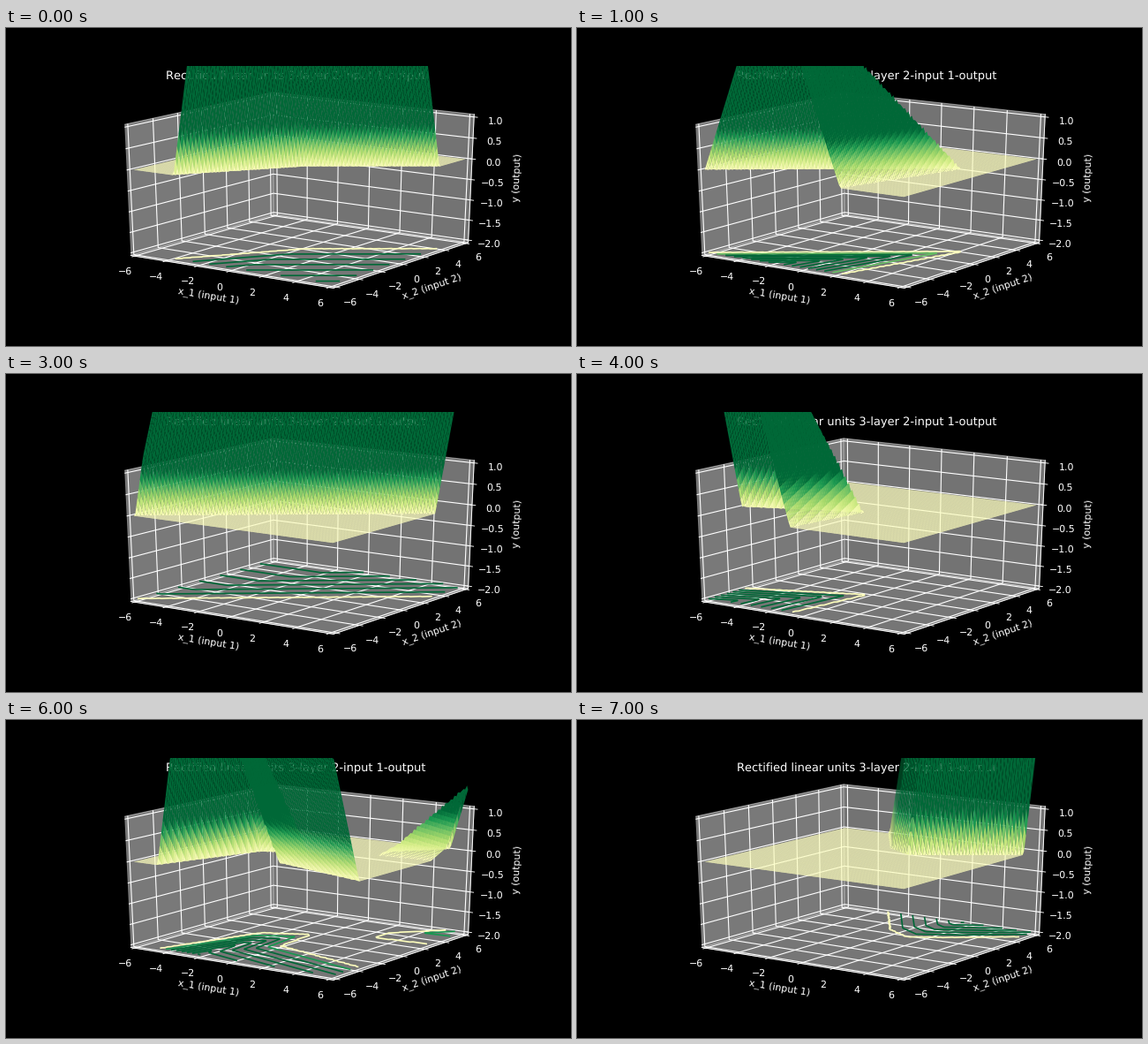
Write a matplotlib script that moves like this. It is 640 by 360 pixels and loops after 8 s.

```python
import numpy as np
import matplotlib.pyplot as plt
from matplotlib.animation import FuncAnimation

plt.style.use("dark_background")
plt.rcParams.update({"text.hinting": "none", "text.hinting_factor": 1,
                     "grid.linewidth": 1.0})

fig = plt.figure(figsize=(8, 4.5), dpi=80)
ax = fig.add_subplot(projection="3d")

# Fill the whole wide axes with a unit cube instead of a square viewport.
ax.apply_aspect = lambda position=None: None
ax.set_box_aspect((1, 1, 1), zoom=3 ** 0.5 / 1.8294640721620434)
ax.view_init(elev=20, azim=-55)
ax.set_xlim(-6.25, 6.25)
ax.set_ylim(-6.25, 6.25)
ax.set_zlim(-2.0625, 1.0625)
ax.set_xlabel("x_1 (input 1)")
ax.set_ylabel("x_2 (input 2)")
ax.set_zlabel("y (output)")
ax.text2D(0.5, 0.944, "Rectified linear units 3-layer 2-input 1-output",
          transform=ax.transAxes, ha="center", va="baseline", fontsize=12)

grid = np.linspace(-6, 6, 100)
X, Y = np.meshgrid(grid, grid)


def relu(v):
    return np.maximum(v, 0)


def lowest(*planes):
    return np.minimum.reduce(planes)


def highest(*planes):
    return np.maximum.reduce(planes)


def front_slope(x, y):
    return lowest(2.4 * (x + 3.5) - 1.71 * (y + 6),
                  1.9 * (x - 0.5) - 2.0 * (y + 0.33),
                  1.2 * (x - 6) - 1.7 * (y - 3.5))


def front_wedge(x, y):
    return lowest(1.5 * (0.73 * (x + 6) - (y + 6)),
                  1.2 * (2.3 + 0.276 * (y + 6) - x))


def small_peak(x, y):
    return lowest(1.9 * (x + 4.35) - 1.75 * (y + 6),
                  -0.32 * (x + 1.25) - 0.227 * (y + 6))


def back_slope(x, y):
    return lowest(1.6 * (y + 5.9 - 0.75 * (x + 6)),
                  1.1 * (y + 6) + 0.3)


def left_wedge(x, y):
    return lowest(0.77 * (x + 6) - 2 * (y + 3),
                  0.2 * (y + 6) - 1.55 * (x + 0.7))


def open_corner(x, y):
    d = relu(0.15 - 0.1 * y + 0.32 * relu(y - 3.9) - x)
    e = relu(0.06 + 0.325 * x - y)
    side = (3 * d - 3.45 * relu(d - 0.52) + 1.85 * relu(d - 1.04)
            + 2.6 * relu(d - 1.9))
    front = 5.5 * e - 4.5 * relu(e - 0.6)
    return highest(side, front)


def two_hills(x, y):
    left_side = 2.4 * (x + 4.5 - 0.347 * (y + 6))
    left = lowest(left_side,
                  1.2 * (0.49 * (x + 2.45) - (y + 0.1)),
                  2.0 * (-0.1 - 0.097 * y - x))
    front = lowest(left_side, 1.25 * (-2.1 - 0.28 * (x - 0.1) - y))
    e = y - 2.4 - 0.1 * (x - 3)
    right = lowest(highest(0.15 * e, 0.75 * (e - 1.1)),
                   1.6 * (x - 3.2 - 0.9 * (y - 3.9)),
                   0.6 * (x - 3))
    return highest(left, front, right)


def back_corner(x, y):
    return lowest(2.6 * (x + 3.1) + 1.88 * (y - 6),
                  2.5 * (y + 0.588 * x - 2.1),
                  2.8 * (y - 1.4 - 0.583 * (x - 1.2)),
                  3.0 * (y - 2.45 - 0.77 * (x - 3)))


outputs = [front_slope, front_wedge, small_peak, back_slope,
           left_wedge, open_corner, two_hills, back_corner]


def draw(i):
    for item in list(ax.collections):
        item.remove()
    z = relu(outputs[i](X, Y))
    look = dict(cmap="RdYlGn", vmin=-1, vmax=1)
    ax.plot_surface(X, Y, z, rstride=1, cstride=1, linewidth=0, **look)
    ax.contour(X, Y, z, zdir="z", offset=-2, **look)
    return ax.collections


anim = FuncAnimation(fig, draw, frames=len(outputs), init_func=lambda: [],
                     interval=1000, repeat=True, repeat_delay=0)
plt.show()
```
